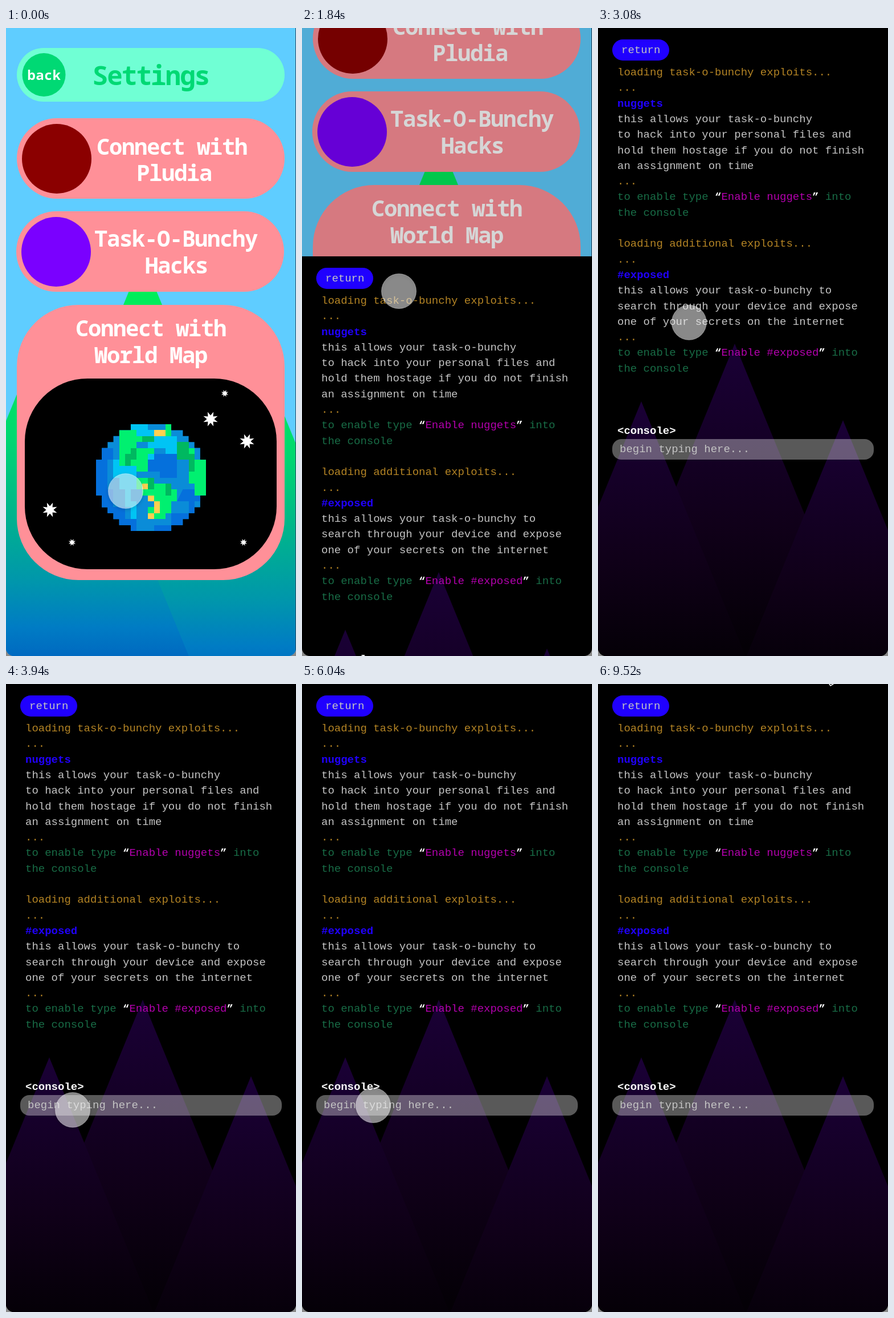
Recreate the animation shown at these times as an HTML page. Size 509x1100 px, loop 9.54 s.

```html
<!DOCTYPE html>
<html lang="en">
<head>
<meta charset="utf-8">
<title>Settings</title>
<style>
html, body { margin: 0; width: 100%; height: 100%; overflow: hidden; background: #8a8a8a; }
svg { display: block; width: 100%; height: 100%; }
text { white-space: pre; }
.title { font: bold 39px "Noto Sans Mono", monospace; letter-spacing: -1.4px; fill: #fff; text-anchor: middle; }
.head { font-size: 46px; letter-spacing: -2px; fill: #00d974; }
.back { font-size: 24px; letter-spacing: .3px; }
.code { font: 19px "Liberation Mono", "Courier New", monospace; fill: #c4c4c4; }
.o { fill: #b48424; }
.b { fill: #2000ff; font-weight: bold; }
.g { fill: #186c46; }
.m { fill: #b400ae; }
.w { fill: #fff; font-weight: bold; }
.card { fill: #ff9098; }
</style>
</head>
<body>
<svg viewBox="0 0 509 1100">
  <defs>
    <linearGradient id="day" x2="0" y2="1">
      <stop stop-color="#00f552"/><stop offset=".35" stop-color="#00d870"/>
      <stop offset=".57" stop-color="#00b48c"/><stop offset=".77" stop-color="#0096ac"/>
      <stop offset=".9" stop-color="#007cc4"/><stop offset="1" stop-color="#0066c0"/>
    </linearGradient>
    <linearGradient id="night" x2="0" y2="1">
      <stop stop-color="#1a0036"/><stop offset=".45" stop-color="#100019"/>
      <stop offset=".75" stop-color="#040006"/>
    </linearGradient>
    <clipPath id="screen"><path d="M0 0H509V1086a14 14 0 0 1-14 14H14a14 14 0 0 1-14-14z"/></clipPath>
    <clipPath id="disc"><path d="M6 0h7v1h2v1h1v1h1v1h1v2h1v6h-1v2h-1v1h-1v1h-1v1h-2v1h-7v-1h-2v-1h-1v-1h-1v-1h-1v-2h-1v-6h1v-2h1v-1h1v-1h1v-1h2z"/></clipPath>
    <filter id="soft" x="-30%" y="-30%" width="160%" height="160%">
      <feDropShadow dx="0" dy="2" stdDeviation="3" flood-opacity=".35"/>
    </filter>
  </defs>
  <g clip-path="url(#screen)">
    <g id="settings">
      <rect width="509" height="1100" fill="#5fcdff"/>
      <g id="green"></g>
      <rect x="19" y="35" width="470" height="94" rx="47" fill="#70ffd4"/>
      <circle cx="66.5" cy="82" r="38" fill="#00d974"/>
      <text class="title back" x="67" y="91">back</text>
      <text class="title head" x="254" y="100">Settings</text>

      <rect class="card" x="19" y="158" width="470" height="141" rx="70.5"/>
      <circle cx="89" cy="229" r="61" fill="#8b0000"/>
      <text class="title" x="291" y="222">Connect with</text>
      <text class="title" x="295" y="268">Pludia</text>

      <rect class="card" x="18" y="321" width="470" height="141" rx="70.5"/>
      <circle cx="88" cy="392" r="61" fill="#7a00ff"/>
      <text class="title" x="298" y="383">Task-O-Bunchy</text>
      <text class="title" x="299" y="430">Hacks</text>

      <rect class="card" x="19" y="485" width="470" height="482" rx="108"/>
      <text class="title" x="254" y="540">Connect with</text>
      <text class="title" x="254" y="587">World Map</text>
      <rect x="33" y="614" width="442" height="334" rx="110"/>
      <g id="stars" fill="#fff"></g>
      <g transform="translate(158 694) scale(10.16 10.39)" clip-path="url(#disc)" shape-rendering="crispEdges">
        <path fill="#0a8cd8" d="M0 0h19v18h-19z"/>
        <path fill="#0570dc" d="M0 6h1v-2h2v2h-1v5h1v3h2v2h2v2h-7zM10 5h4v4h-3v-1h-2v-2h1zM14 13h2v2h-3v2h-3v1h5v-2h2v-3h1v-2h-3z"/>
        <path fill="#00c4f4" d="M6 0h3v1h3v1h2v3h-2v-1h-3v-1h-3zM4 6h2v-2h3v-1h3v1h-2v2h-3v5h-1v2h1v3h-1v-2h-1v-3h-1v-2h-1v-3z"/>
        <path fill="#00f070" d="M4 1h3v1h2v1h-2v1h-1v3h-2zM7 4h3v1h-1v3h-2v-1h-1v-2h1zM7 9h3v1h2v1h2v2h-1v2h-1v1h-3v-2h1v-2h-2v-1h-1zM12 0h1v2h-1zM16 4h1v2h2v6h-2v-2h-1v-3h1v-1h-1z"/>
        <path fill="#00b860" d="M6 4h1v2h-1zM14 3h2v2h1v3h-1v-2h-2zM8 2h2v1h-2zM12 10h1v2h-1zM5 5h1v2h-1zM9 9h1v2h-1z"/>
        <path fill="#ffd050" d="M10 1h2v1h-2zM8 10h1v1h-1zM9 12h1v1h1v2h-1v1h-1v-1h1v-2h-1z"/>
      </g>
      <path d="M508.5 0V1100" stroke="#2a4a66"/>
    </g>
    <rect id="dim" width="509" height="1100"/>
    <g id="console">
      <rect width="509" height="1100"/>
      <g id="purple" transform="translate(0 151)"></g>
      <rect x="25" y="20" width="100" height="37" rx="18.5" fill="#2000ff"/>
      <text class="code" x="41" y="44">return</text>
      <g id="lines"></g>
      <rect x="25" y="720" width="459" height="36" rx="16" fill="#fff" fill-opacity=".35"/>
      <text class="code" x="38" y="743">begin typing here...</text>
    </g>
    <circle id="touch" r="30.5" fill="#fff" fill-opacity=".49" stroke="#fff" stroke-opacity=".35" filter="url(#soft)"/>
    <path id="arrow" d="M404 -3L408 3L413 0L411 -4" stroke="#fff" stroke-width="1.5"/>
  </g>
</svg>
<script>
const $ = id => document.getElementById(id);

// Mountains: apex x, apex y, height; back to front
const peaks = [[240, 402, 708], [430, 536, 607], [76, 503, 607]];
const range = fill => peaks.map(([x, y, h]) =>
  `<path fill="url(#${fill})" d="M${x} ${y}l${-.41 * h} ${h}h${.82 * h}z"/>`).join('');
$('green').innerHTML = range('day');
$('purple').innerHTML = range('night');

function star([cx, cy, r]) {
  const pts = Array.from({ length: 16 }, (_, i) => {
    const a = (i + 1) * Math.PI / 8, d = i % 2 ? r * .48 : r;
    return [cx + d * Math.sin(a), cy - d * Math.cos(a)];
  });
  return `<polygon points="${pts.join(' ')}"/>`;
}
$('stars').innerHTML = [[359, 685, 13.5], [423, 724, 13.5], [77, 844, 13.5],
  [384, 640, 6.5], [116, 901, 6.5], [417, 901, 6.5]].map(star).join('');

// Console text: each line is a list of "class|text" spans
const enable = name => ['g|to enable type ', 'w|“', 'm|Enable ' + name, 'w|”', 'g| into'];
const lines = [
  ['o|loading task-o-bunchy exploits...'],
  ['o|...'],
  ['b|nuggets'],
  ['|this allows your task-o-bunchy'],
  ['|to hack into your personal files and'],
  ['|hold them hostage if you do not finish'],
  ['|an assignment on time'],
  ['o|...'],
  enable('nuggets'),
  ['g|the console'],
  [],
  ['o|loading additional exploits...'],
  ['o|...'],
  ['b|#exposed'],
  ['|this allows your task-o-bunchy to'],
  ['|search through your device and expose'],
  ['|one of your secrets on the internet'],
  ['o|...'],
  enable('#exposed'),
  ['g|the console'],
  [], [], [],
  ['w|&lt;console>']
];
$('lines').innerHTML = lines.map((spans, i) => {
  const body = spans.map(s => {
    const [cls, text] = s.split('|');
    return `<tspan class="${cls}">${text}</tspan>`;
  }).join('');
  return `<text class="code" x="34" y="${83 + 27.3 * i}">${body}</text>`;
}).join('');

const LOOP = 9540;
// Touch point: time, x, y
const path = [[0, 210, 811], [250, 210, 811], [1450, 170, 461], [2800, 170, 461],
  [3800, 117, 746], [4200, 117, 746], [5900, 125, 738], [6900, 125, 738], [7650, 408, -40]];
const clamp = v => Math.min(1, Math.max(0, v));
const smooth = v => v * v * (3 - 2 * v);

function touchAt(t) {
  const i = path.findIndex(p => p[0] > t);
  if (i < 0) return path[path.length - 1].slice(1);
  const [t0, x0, y0] = path[i - 1], [t1, x1, y1] = path[i];
  const k = smooth((t - t0) / (t1 - t0));
  return [x0 + (x1 - x0) * k, y0 + (y1 - y0) * k];
}

function draw(now) {
  const t = now % LOOP;
  const p = 1 - (1 - clamp((t - 1670) / 1102)) ** 6;
  $('settings').setAttribute('transform', `translate(0 ${-330 * p})`);
  $('console').setAttribute('transform', `translate(0 ${1100 * (1 - p)})`);
  $('dim').setAttribute('opacity', .25 * p);
  $('touch').setAttribute('transform', `translate(${touchAt(t)})`);
  $('arrow').setAttribute('visibility', t > 7650 ? 'visible' : 'hidden');
}

const start = performance.now();
function tick() {
  draw(performance.now() - start);
  requestAnimationFrame(tick);
}
tick();
</script>
</body>
</html>
```
